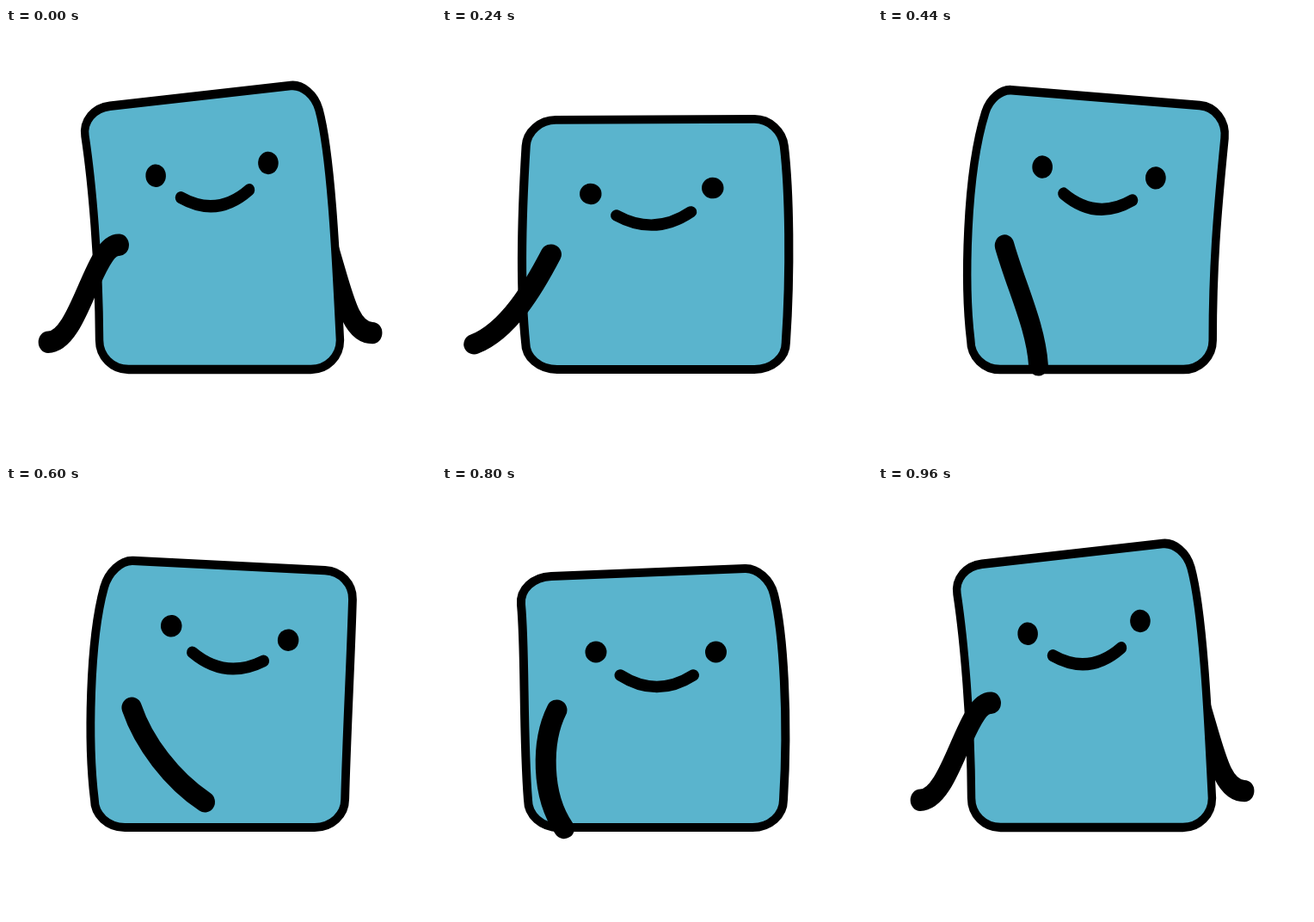
Recreate the animation shown at these times as an HTML page with a canvas. Size 500 px wide and 500 px high, loop 1 s.

```html
<!DOCTYPE html>
<html lang="en">
<head>
<meta charset="utf-8">
<title>Dancing block</title>
<style>
  html, body { margin: 0; height: 100%; overflow: hidden; background: #fff; }
  canvas { display: block; width: 100vw; height: 100vh; }
</style>
</head>
<body>
<canvas id="stage" width="500" height="500"></canvas>
<script>
const ctx = document.getElementById('stage').getContext('2d');
const LOOP = 1000, CYCLE = 960, STEP = 40;
const BLUE = '#5ab4cd';

// Keys are rows of [time, ...values].

// Body outline: left side (2 handles, end), top edge (2 ends), right side (end, 2 handles)
const bodyKeys = [
  [0,   99.4,277, 91,192, 82.4,141, 113,108, 336,85.7, 371,112, 387,164, 393,296],
  [160, 94,290, 97,190, 92,138, 127,105, 352,96, 386,126, 397,170, 403,270],
  [320, 90,280, 98,175, 109,126, 142,97, 370,104, 404,138, 405,200, 402,290],
  [360, 92,302, 94,184, 111.4,123.5, 146,93, 373.4,104, 406,137, 404,204, 399,292],
  [440, 92,305, 94,182, 118,113.5, 150,89, 381,106, 411.6,142, 402,229, 397,286],
  [480, 91.5,306, 94,181, 121,109.5, 152,87, 384.5,107, 414,144, 402,240, 396,285]
];

// Face: shift x, shift y, tilt in degrees
const left = [-9.75, -15.5, -5.76], middle = [0, 0, 0], right = [11.65, -17.6, 6.65];
const faceKeys = [left, left, middle, right, right, middle, left]
  .map((pose, i) => [i * 160, ...pose]);

// Front arm: swing in degrees, handle at the shoulder, handle at the hand
const frontKeys = [
  [0, -39.5, -32, -2, 39, 0],
  [160, -51, -34, 24, 40, 0],
  [320, -20.4, -2, 51, 33, -34],
  [440, 17.5, 15, 47, -3, -42],
  [600, 38.9, 14, 40, -39, -25],
  [800, 3.5, -18, 36, -27, -39]
];

// Back arm: hand position
const backKeys = [[0, 437, 357], [160, 437.5, 357], [320, 345, 370], [800, 345, 370]];

const rad = deg => deg * Math.PI / 180;

function linear(keys, t) {
  let i = 0;
  while (i < keys.length - 2 && t >= keys[i + 1][0]) i++;
  const a = keys[i], b = keys[i + 1], u = (t - a[0]) / (b[0] - a[0]);
  return a.slice(1).map((v, k) => v + (b[k + 1] - v) * u);
}

// Smooth curve through keys that repeat every cycle
function spline(keys, t) {
  const n = keys.length;
  const key = i => {
    const row = keys[(i + n) % n];
    return [row[0] + Math.floor(i / n) * CYCLE, ...row.slice(1)];
  };
  let i = 0;
  while (i < n - 1 && t >= keys[i + 1][0]) i++;
  const [p, a, b, q] = [i - 1, i, i + 1, i + 2].map(key);
  const h = b[0] - a[0], u = (t - a[0]) / h, w = u * u * (3 - 2 * u);
  return a.slice(1).map((v, j) => {
    const k = j + 1;
    const m0 = (b[k] - p[k]) / (b[0] - p[0]), m1 = (q[k] - v) / (q[0] - a[0]);
    return v + (b[k] - v) * w + h * u * (1 - u) * (m0 * (1 - u) - m1 * u);
  });
}

// Crossing of line a-b with line c-d
function cross(a, b, c, d) {
  const rx = b[0] - a[0], ry = b[1] - a[1], sx = d[0] - c[0], sy = d[1] - c[1];
  const u = ((c[0] - a[0]) * sy - (c[1] - a[1]) * sx) / (rx * sy - ry * sx);
  return [a[0] + rx * u, a[1] + ry * u];
}

// Rounded corner from a to b around the tip
function corner(a, tip, b) {
  const toward = p => p.map((v, k) => v + (tip[k] - v) * 0.56);
  ctx.bezierCurveTo(...toward(a), ...toward(b), ...b);
}

function stroke(width, colour = '#000') {
  ctx.lineWidth = width;
  ctx.strokeStyle = colour;
  ctx.stroke();
}

function drawBody(t) {
  const v = linear(bodyKeys, Math.min(t, CYCLE - t));
  const [l1, l2, lt, tl, tr, rt, r2, r1] =
    Array.from({ length: 8 }, (_, i) => v.slice(2 * i, 2 * i + 2));
  const lb = [100, 365], rb = [397, 365], bl = [136, 397], br = [361, 397];
  ctx.beginPath();
  ctx.moveTo(...lb);
  ctx.bezierCurveTo(...l1, ...l2, ...lt);
  corner(lt, cross(l2, lt, tr, tl), tl);
  ctx.lineTo(...tr);
  corner(tr, cross(r2, rt, tl, tr), rt);
  ctx.bezierCurveTo(...r2, ...r1, ...rb);
  corner(rb, [397, 397], br);
  ctx.lineTo(...bl);
  corner(bl, [100, 397], lb);
  ctx.closePath();
  ctx.fillStyle = BLUE;
  ctx.fill();
  stroke(10);
}

function drawFace(t, [dx, dy, tilt]) {
  const shut = t >= 280 && t <= 360;
  ctx.save();
  ctx.translate(248.75 + dx, 193 + dy);
  ctx.rotate(rad(tilt));
  for (const x of [-69.75, 69.75]) {
    ctx.beginPath();
    if (shut) {
      ctx.moveTo(x - 15, 6);
      ctx.quadraticCurveTo(x, -8, x + 15, 6);
      stroke(10, '#252d36');
    } else {
      ctx.arc(x, 0, 12.5, 0, 7);
      ctx.fillStyle = '#000';
      ctx.fill();
    }
  }
  ctx.beginPath();
  ctx.moveTo(-41.5, 27);
  ctx.quadraticCurveTo(1, 54, 43.5, 27);
  stroke(13.5);
  ctx.restore();
}

function drawArm(x, y, c1x, c1y, c2x, c2y, hx, hy) {
  ctx.beginPath();
  ctx.moveTo(x, y);
  ctx.bezierCurveTo(x + c1x, y + c1y, hx + c2x, hy + c2y, hx, hy);
  stroke(24);
}

function drawFrontArm(t, dx) {
  const [swing, ...handles] = spline(frontKeys, t);
  const x = 133.5 + dx * 0.92, y = 260.5, a = rad(swing);
  drawArm(x, y, ...handles, x + 138 * Math.sin(a), y + 138 * Math.cos(a));
}

function drawBackArm(t) {
  const [hx, hy] = spline(backKeys, t);
  drawArm(373, 235, hx - 410, hy - 287, -32, 0, hx, hy);
}

function draw(now) {
  const t = Math.floor(now % LOOP / STEP) * STEP % CYCLE;
  const tall = (1 + Math.cos(4 * Math.PI * t / CYCLE)) / 2 - 0.25;
  const face = linear(faceKeys, t);

  ctx.setTransform(1, 0, 0, 1, 0, 0);
  ctx.fillStyle = '#fff';
  ctx.fillRect(0, 0, 500, 500);
  ctx.lineCap = ctx.lineJoin = 'round';

  // Stretch and squash about the middle of the base
  ctx.translate(248.5, 397);
  ctx.scale(1 - 0.0768 * tall, 1 + 0.08 * tall);
  ctx.translate(-248.5, -397);
  drawBackArm(t);
  drawBody(t);
  drawFace(t, face);
  drawFrontArm(t, face[0]);
}

let start;
function tick(now) {
  start ??= now;
  draw(now - start);
  requestAnimationFrame(tick);
}
draw(0);
requestAnimationFrame(tick);
</script>
</body>
</html>
```
